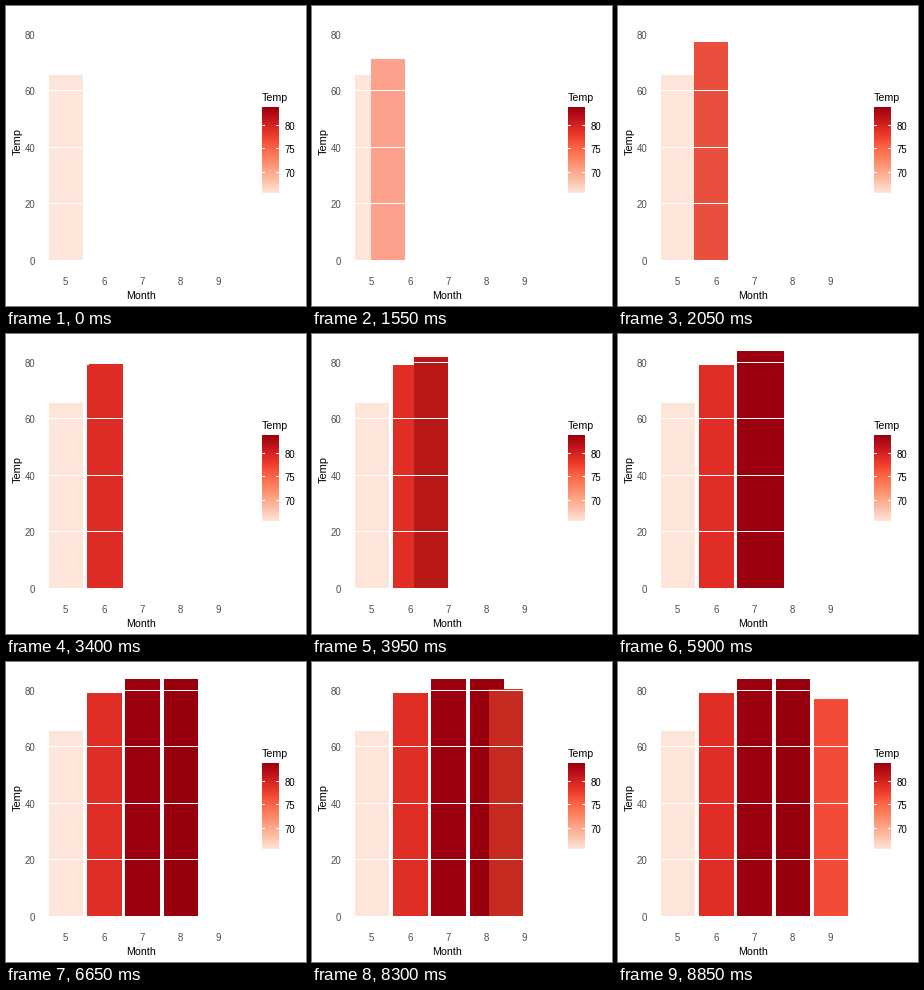
Write a matplotlib script that moves like this. It is 300 px wide and 300 px high and loops after 10 s.

```python
import numpy as np
import matplotlib.pyplot as plt
from matplotlib.animation import FuncAnimation
from matplotlib.patches import Rectangle

SIZE, DPI = 300, 100
FRAMES, INTERVAL = 200, 50
MONTHS = [5, 6, 7, 8, 9]
TEMPS = [65.548, 79.1, 83.903, 83.968, 76.9]
LOW, HIGH = min(TEMPS), max(TEMPS)
REDS = ["FEE5D9", "FCBBA1", "FC9272", "FB6A4A", "EF3B2C", "CB181D", "99000D"]
MOVE_STARTS = [23, 68, 112, 156]
MOVE_STEPS = 22

BASE_Y, Y_SCALE = 253.7, 2.82
FIRST_X, X_STEP = 60.14, 38.2
BAR_WIDTH = 0.9 * X_STEP
TICK_PX, TITLE_PX = 9.6, 10.6
GREY = "#4D4D4D"

WHITE_POINT = np.array([0.95047, 1.0, 1.08883])
RGB_TO_XYZ = np.array([[0.4124564, 0.3575761, 0.1804375],
                       [0.2126729, 0.7151522, 0.0721750],
                       [0.0193339, 0.1191920, 0.9503041]])


def rgb_to_lab(rgb):
    linear = np.where(rgb <= 0.04045, rgb / 12.92, ((rgb + 0.055) / 1.055) ** 2.4)
    xyz = RGB_TO_XYZ @ linear / WHITE_POINT
    f = np.where(xyz > 0.008856, np.cbrt(xyz), 7.787 * xyz + 16 / 116)
    return np.array([116 * f[1] - 16, 500 * (f[0] - f[1]), 200 * (f[1] - f[2])])


def lab_to_rgb(lab):
    fy = (lab[0] + 16) / 116
    f = np.array([fy + lab[1] / 500, fy, fy - lab[2] / 200])
    xyz = np.where(f ** 3 > 0.008856, f ** 3, (f - 16 / 116) / 7.787) * WHITE_POINT
    linear = np.clip(np.linalg.solve(RGB_TO_XYZ, xyz), 0, 1)
    return np.where(linear <= 0.0031308, 12.92 * linear,
                    1.055 * linear ** (1 / 2.4) - 0.055)


REDS_LAB = [rgb_to_lab(np.array(list(bytes.fromhex(c))) / 255) for c in REDS]


def mix(a, b, t):
    return a + (b - a) * t


def temp_lab(temp):
    pos = np.clip((temp - LOW) / (HIGH - LOW), 0, 1) * (len(REDS) - 1)
    i = min(int(pos), len(REDS) - 2)
    return mix(REDS_LAB[i], REDS_LAB[i + 1], pos - i)


def y_pixel(temp):
    return BASE_Y - Y_SCALE * temp


plt.rcParams["font.family"] = "Liberation Sans"
fig = plt.figure(figsize=(SIZE / DPI, SIZE / DPI), dpi=DPI, facecolor="white")
ax = fig.add_axes([0, 0, 1, 1])
ax.set_xlim(0, SIZE)
ax.set_ylim(SIZE, 0)
ax.axis("off")


def box(x, y, w, h, color, z=1):
    patch = Rectangle((x, y), w, h, fc=color, lw=0, antialiased=False, zorder=z)
    return ax.add_patch(patch)


def label(x, y, text, px=TICK_PX, color="black", ha="center", rotation=0):
    ax.text(x, y, text, fontsize=px * 72 / DPI, color=color, ha=ha,
            va="baseline", rotation=rotation, rotation_mode="anchor")


def place(bar, index, temp, lab):
    """Snap a bar to whole pixels at a (possibly fractional) month index."""
    left = FIRST_X + index * X_STEP - BAR_WIDTH / 2
    x0, x1, top = round(left), round(left + BAR_WIDTH), round(y_pixel(temp))
    bar.set_bounds(x0, top, x1 - x0, 254 - top)
    bar.set_facecolor(lab_to_rgb(lab))


def draw_axes():
    for temp in range(0, 81, 20):
        row = round(y_pixel(temp) - 0.05)
        box(37, row, 199, 1, "white", z=3)
        label(29.5, row + 5, str(temp), color=GREY, ha="right")
    for i, month in enumerate(MONTHS):
        label(FIRST_X - 0.6 + i * X_STEP, 279, str(month), color=GREY)
    label(135.5, 293, "Month", px=TITLE_PX)
    label(15, 135.5, "Temp", px=11, rotation=90)


def draw_legend():
    left, top, width, height = 256, 101, 17, 86
    label(left - 0.3, 95, "Temp", px=TITLE_PX, ha="left")
    for row in range(height):
        temp = mix(HIGH, LOW, (row + 0.5) / height)
        box(left, top + row, width, 1, lab_to_rgb(temp_lab(temp)))
    for temp in (70, 75, 80):
        row = int(top + (HIGH - temp) / (HIGH - LOW) * height)
        for x in (left, left + width - 3):
            box(x, row, 3, 1, "white", z=2)
        label(278.7, row + 5, str(temp), ha="left")


draw_axes()
draw_legend()
bars = [box(0, 0, 0, 0, "white") for _ in MONTHS]
for i, temp in enumerate(TEMPS):
    place(bars[i], i, temp, temp_lab(temp))
mover = box(0, 0, 0, 0, "white", z=2)


def update(frame):
    reached, moving = 0, False
    for i, start in enumerate(MOVE_STARTS):
        step = frame - start + 1
        if step >= MOVE_STEPS:
            reached = i + 1
        elif step > 0:
            moving = True
            t = step / MOVE_STEPS
            a, b = TEMPS[i], TEMPS[i + 1]
            place(mover, i + t, mix(a, b, t), mix(temp_lab(a), temp_lab(b), t))
    mover.set_visible(moving)
    for i, bar in enumerate(bars):
        bar.set_visible(i <= reached)
    return [*bars, mover]


anim = FuncAnimation(fig, update, frames=FRAMES, interval=INTERVAL,
                     repeat=True, repeat_delay=0, blit=False)
plt.show()
```
